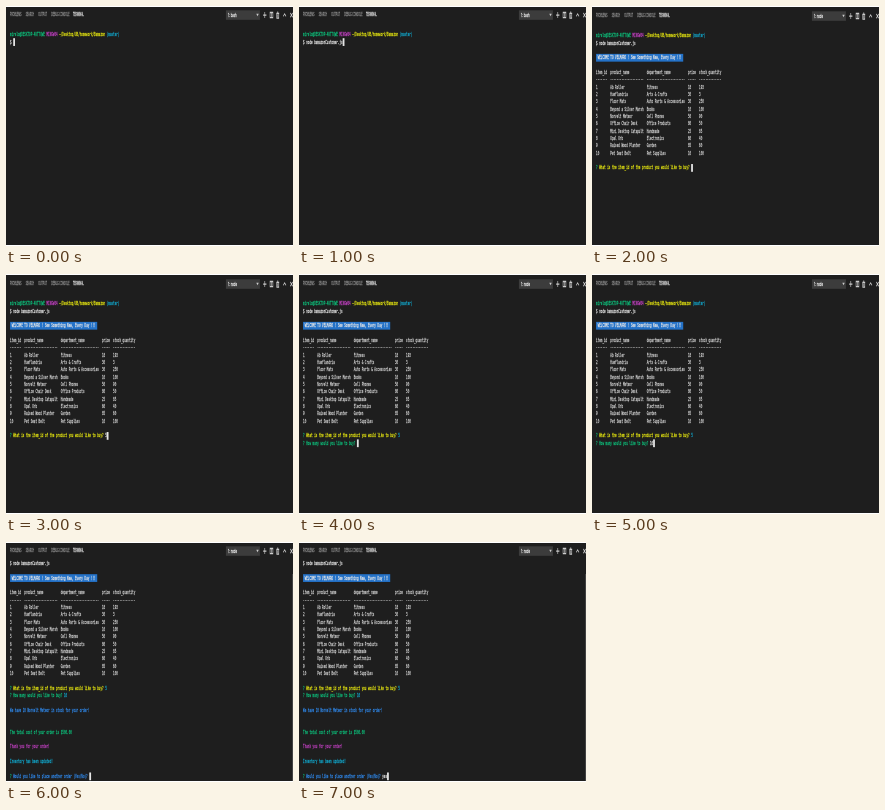
Recreate the animation shown at these times as an HTML page with a canvas. Size 287 by 240 pixels, loop 8000 ms.

```html
<!DOCTYPE html>
<html lang="en">
<head>
<meta charset="utf-8">
<title>Terminal shop order</title>
<style>
  html, body { margin: 0; width: 100%; height: 100%; overflow: hidden; background: #1e1e1e; }
  canvas { display: block; width: 287px; height: 240px; }
</style>
</head>
<body>
<canvas id="stage" width="287" height="240"></canvas>
<script>
const ctx = document.getElementById('stage').getContext('2d');
const LOOP = 8000;
// The wide window is squeezed as a whole into the stage.
const SX = 0.2025, SY = 0.432;
const LEFT = 20, TOP = 66.5, LINE = 17, CHAR = 7.826;
const MONO = '13px "DejaVu Sans Mono", monospace';
const SANS = '11px "Open Sans", sans-serif';
const WHITE = '#e5e5e5', GREY = '#cccccc', GREEN = '#0dbc79', YELLOW = '#e5e510',
      BLUE = '#2f86e6', CYAN = '#11a8cd', MAGENTA = '#bc3fbc';

const PRODUCTS = [
  ['Ab Roller', 'Fitness', 18, 193],
  ['Hueflandria', 'Arts & Crafts', 30, 3],
  ['Floor Mats', 'Auto Parts & Accessories', 30, 250],
  ['Beyond a Silver Marsh', 'Books', 10, 100],
  ['Norvelt Meteor', 'Cell Phones', 50, 90],
  ['Office Chair Desk', 'Office Products', 80, 50],
  ['Mini Desktop Catapult', 'Handmade', 25, 85],
  ['Opal Orb', 'Electronics', 60, 40],
  ['Raised Wood Planter', 'Garden', 85, 60],
  ['Pet Seat Belt', 'Pet Supplies', 10, 100]
];
const WIDTHS = [7, 21, 24, 5, 14];
const tableRow = cells => cells.map((c, i) => String(c).padEnd(WIDTHS[i])).join('  ');
const table = [
  tableRow(['item_id', 'product_name', 'department_name', 'price', 'stock_quantity']),
  tableRow(WIDTHS.map(w => '-'.repeat(w))),
  ...PRODUCTS.map((p, i) => tableRow([i + 1, ...p]))
];

// A hairline outline keeps the squeezed strokes solid.
function label(text, x, y, color, font = SANS) {
  ctx.font = font;
  ctx.fillStyle = ctx.strokeStyle = color;
  ctx.lineWidth = 0.6;
  ctx.fillText(text, x, y);
  ctx.strokeText(text, x, y);
}

function box(x, y, w, h, color) {
  ctx.fillStyle = color;
  ctx.fillRect(x, y, w, h);
}

function stroke(path) {
  ctx.strokeStyle = GREY;
  ctx.lineWidth = 3;
  ctx.stroke(new Path2D(path));
}

// Prints coloured pieces on one line and returns the column after them.
function print(row, ...pieces) {
  let col = 0;
  for (const [text, color] of pieces) {
    label(text, LEFT + col * CHAR, TOP + row * LINE, color, MONO);
    col += text.length;
  }
  return col;
}

function cursor(row, col) {
  box(LEFT + col * CHAR, TOP - 9 + row * LINE, CHAR + 1, 18, WHITE);
}

function drawHeader(shell) {
  [['PROBLEMS', 20], ['SEARCH', 98], ['OUTPUT', 159], ['DEBUG CONSOLE', 223]]
    .forEach(([text, x]) => label(text, x, 20, '#8c8c8c'));
  label('TERMINAL', 331, 20, WHITE);
  box(1086, 10, 168, 22, '#3c3c3c');
  label(shell, 1095, 21, '#f0f0f0', '13px "Open Sans", sans-serif');
  ctx.fillStyle = GREY;
  ctx.fill(new Path2D('M1236 18h12l-6 6z'));
  stroke('M1270 21h16M1278 14v14');
  stroke('M1304 15h14v12h-14zM1311 15v12');
  stroke('M1335 17h14M1340 14h4M1337 17v11h10v-11M1342 19v7');
  stroke('M1369 24l7-6l7 6');
  stroke('M1404 16l12 10M1416 16l-12 10');
}

function drawTerminal(step) {
  const done = step >= 6;
  const at = row => done ? row - 2 : row;

  if (!done) {
    print(0, ['mirelo@DESKTOP-4KT7QWE ', GREEN], ['MINGW64 ', MAGENTA],
      ['~/Desktop/UB/homework/Bamazon ', YELLOW], ['(master)', CYAN]);
  }
  const command = step ? 'node bamazonCustomer.js' : '';
  const end = print(at(1), ['$ ' + command, WHITE]);
  if (step < 2) return cursor(1, end);

  const banner = ' WELCOME TO VELMARO ! See Something New, Every Day !!! ';
  box(LEFT, TOP - 9 + at(3) * LINE, banner.length * CHAR, 18, '#2472c8');
  print(at(3), [banner, WHITE]);
  table.forEach((text, i) => print(at(5 + i), [text, GREY]));

  const item = print(at(18), ['? ', GREEN],
    ['What is the item_id of the product you would like to buy? ', YELLOW],
    [step > 2 ? '5' : '', step > 3 ? CYAN : WHITE]);
  if (step < 4) return cursor(18, item);

  const amount = print(at(19), ['? ', GREEN], ['How many would you like to buy? ', GREEN],
    [step > 4 ? '10' : '', done ? CYAN : WHITE]);
  if (!done) return cursor(19, amount);

  print(at(21), ['We have 10 Norvelt Meteor in stock for your order!', BLUE]);
  print(at(24), ['The total cost of your order is $500.00', GREEN]);
  print(at(26), ['Thank you for your order!', MAGENTA]);
  print(at(28), ['Inventory has been updated!', CYAN]);
  const again = print(at(30), ['? ', GREEN],
    ['Would you like to place another order (Yes/No)? ', BLUE],
    [step > 6 ? 'yes' : '', WHITE]);
  cursor(at(30), again);
}

function draw(now) {
  const step = Math.floor(now % LOOP / 1000);
  const shift = step > 1 && step < 6 ? 1 : 0;
  ctx.setTransform(1, 0, 0, 1, 0, 0);
  box(0, 0, 287, 240, '#1e1e1e');
  if (step >= 6) box(286, 32, 1, 207, '#424242');

  ctx.setTransform(SX, 0, 0, SY, 0, shift);
  ctx.textBaseline = 'middle';
  drawHeader(step < 2 ? '1: bash' : '1: node');
  drawTerminal(step);

  ctx.setTransform(1, 0, 0, 1, 0, 0);
  box(0, 0, 287, 1, '#ffffff');
  box(0, 239, 287, 1, '#ffffff');
  requestAnimationFrame(draw);
}
requestAnimationFrame(draw);
</script>
</body>
</html>
```
